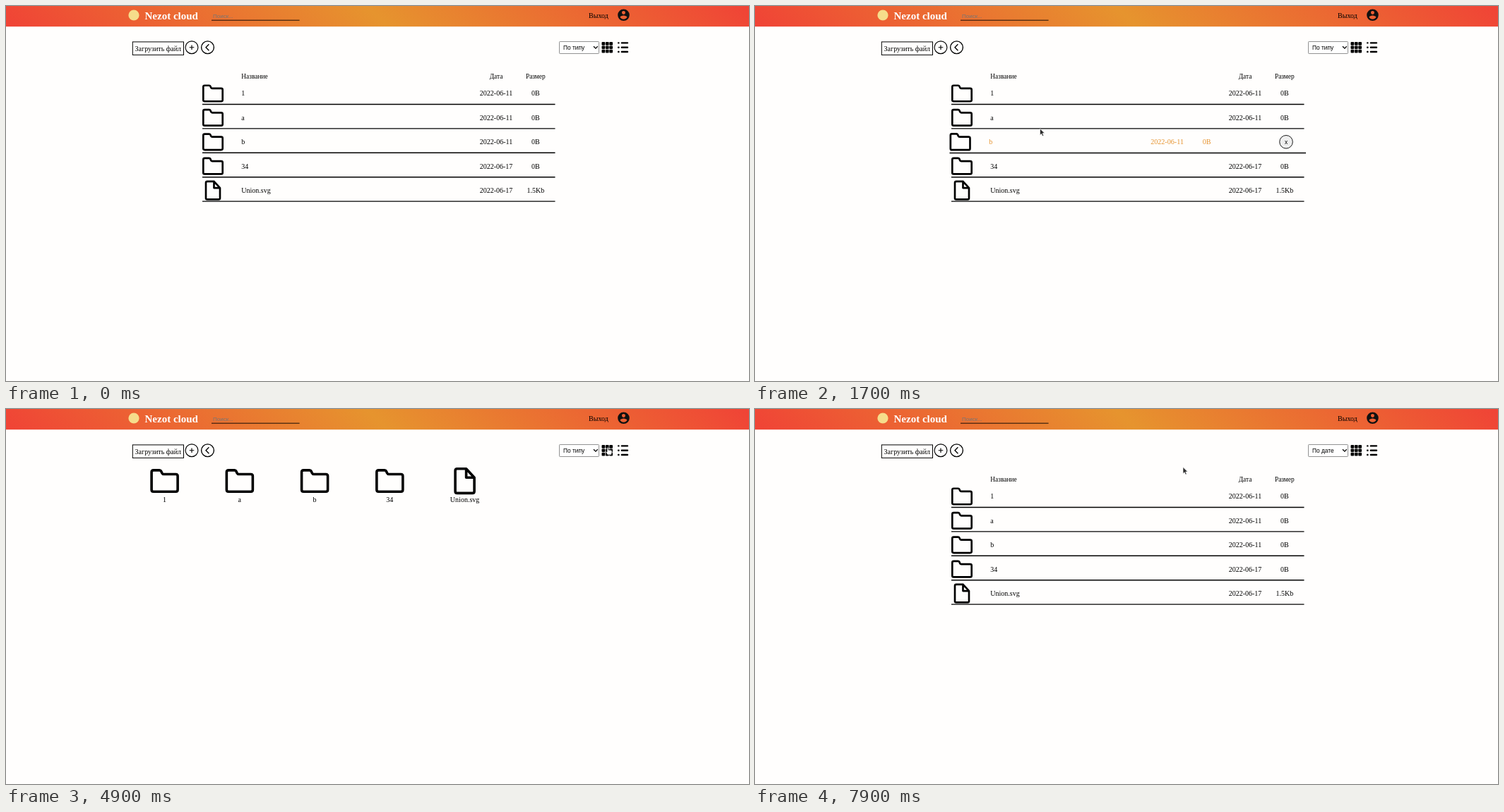
Write an HTML page that moves like this. It is 1052 px wide and 532 px high and loops after 8000 ms.

```html
<!DOCTYPE html>
<html lang="ru">
<head>
<meta charset="utf-8">
<title>Файлы</title>
<style>
  html, body { margin: 0; width: 100%; height: 100%; overflow: hidden; background: #fffefd; }
  svg { display: block; width: 1052px; height: 532px; }
  text { font: 10.02px "Liberation Serif", serif; white-space: pre; }
  .sans { font: 8.35px "Liberation Sans", sans-serif; }
  .mid { text-anchor: middle; }
  .line { fill: none; stroke: #000; }
</style>
</head>
<body>
<svg viewBox="0 0 1052 532">
  <defs>
    <linearGradient id="sunset" gradientUnits="userSpaceOnUse" x1="256" y1="285" x2="796" y2="-255">
      <stop offset="0" stop-color="#f04336"/>
      <stop offset=".5" stop-color="#e6942e"/>
      <stop offset="1" stop-color="#f04336"/>
    </linearGradient>
    <filter id="shadow" x="-20%" y="-20%" width="140%" height="150%">
      <feDropShadow dx="0" dy="1.5" stdDeviation="1.6" flood-opacity=".4"/>
    </filter>
    <path id="folder" class="line" stroke-width="3.6" stroke-linejoin="round" d="M-18.5-12.5q0-2.7 2.7-2.7h8.5q1.8 0 2.5 1.6l1 2.4q.7 1.6 2.5 1.6h17.1q2.7 0 2.7 2.7v19.4q0 2.7-2.7 2.7h-31.6q-2.7 0-2.7-2.7z"/>
    <path id="file" class="line" stroke-width="3.6" stroke-linejoin="round" d="M13.5-4.8H2V-17.3H-10.8q-2.7 0-2.7 2.7V14.6q0 2.7 2.7 2.7H10.8q2.7 0 2.7-2.7V-4.8L2-17.3"/>
    <path id="arrow" fill="#2b2b2b" stroke="#fff" stroke-width=".6" d="M0 0v9.2l2.1-2 1.5 3.4 1.6-.7-1.5-3.3h2.9z"/>
    <path id="hand" fill="#fff" stroke="#222" stroke-width=".8" stroke-linejoin="round" d="M-1 .9q1-1.5 2 0v3.3q1-.8 1.7.2 1-.7 1.7.3 1.2-.4 1.6.8v2.6l-1 3h-5.2l-2.6-4q-.4-1.4 1.8-.2z"/>
  </defs>

  <rect width="1052" height="532" fill="#fffefd"/>
  <rect width="1052" height="29.2" fill="url(#sunset)"/>
  <circle cx="181" cy="13" r="7.6" fill="#f6dd8b"/>
  <text x="196.5" y="18.6" fill="#fff" style="font-size:15px;font-weight:bold">Nezot cloud</text>
  <text class="sans" x="293" y="16.6" fill="#757575" style="font-size:8px">Поиск...</text>
  <path class="line" d="M291 20.2H415.6" stroke-width=".9"/>
  <text x="825" y="17.3">Выход</text>
  <path transform="translate(864.5 2.8) scale(.83)" fill="#111" fill-rule="evenodd" d="M12 2a10 10 0 1 0 0 20 10 10 0 1 0 0-20zm0 3a3 3 0 1 1 0 6 3 3 0 1 1 0-6zm0 14.2c-2.5 0-4.7-1.3-6-3.2 0-2 4-3.1 6-3.1s6 1.1 6 3.1c-1.3 1.9-3.5 3.2-6 3.2z"/>

  <rect class="line" x="179.3" y="50.9" width="72.2" height="18.5"/>
  <text x="182.6" y="63.8">Загрузить файл</text>
  <g class="line" stroke-width="1.35">
    <path d="M259.7 58.7h6.6M263 55.4v6.6" stroke-width="1.15"/>
    <circle cx="263" cy="58.7" r="8.9" stroke-width="1.15"/>
    <circle cx="285.5" cy="58.7" r="8.9"/>
    <path d="M287.4 54.2l-4.4 4.5 4.4 4.5"/>
  </g>
  <g id="icons"></g>
  <rect x="783.5" y="50.5" width="56" height="17" rx=".8" fill="#fff" stroke="#767676" stroke-width=".8"/>
  <text id="order" class="sans" x="789" y="62"></text>
  <path class="line" d="M832 57.2l2.9 2.9 2.9-2.9" stroke-width="1.3"/>
  <g id="files"></g>
  <g id="menu"></g>
  <use id="cursor"/>
</svg>

<script>
const LOOP = 8000, STEP = 100;
const ORANGE = '#e69430';
const ROW = 34.4, FIRST = 124, LEFT = 278, RIGHT = 777.5, CENTER = (LEFT + RIGHT) / 2;
const DATE = 694, SIZE = 749.8;
const OPTION = 10.8, MENU_TOP = 68;
const names = ['1', 'a', 'b', '34', 'Union.svg'];
const orders = ['По имени', 'По типу', 'По дате'];
const isFile = name => name.includes('.');

// Pointer moves: start, duration, x and y reached; it rests in between
const moves = [
  [300, 400, 385, 256],
  [700, 200, 428, 190],
  [1000, 200, 424, 108],
  [1200, 200, 405, 226],
  [1500, 400, 402, 122],
  [1900, 500, 391, 247],
  [2580, 520, 736, 232],
  [3400, 200, 744, 219],
  [3700, 40, 755, 248],
  [3800, 300, 838, 56],
  [4200, 300, 852, 54],
  [5100, 100, 856, 56],
  [5300, 100, 871, 60],
  [5700, 400, 800, 125],
  [6100, 400, 829.5, 58],
  [6900, 200, 830, 80],
  [7200, 100, 830, 90],
  [7400, 500, 606, 82.5]
];

const $ = id => document.getElementById(id);
const text = (x, y, s, cls = '', fill = '#000') =>
  `<text x="${x}" y="${y}" class="${cls}" fill="${fill}">${s}</text>`;
const icon = (name, x, y, k) =>
  `<use href="#${isFile(name) ? 'file' : 'folder'}" transform="translate(${x} ${y}) scale(${k})"/>`;
const button = (x, y, s) =>
  `<circle cx="${x}" cy="${y}" r="9.2" fill="#efefef" stroke="#000" stroke-width=".9"/>` +
  text(x, y + 2.8, s, 'sans mid');

function ease(k) {
  k = Math.min(1, Math.max(0, k));
  return k * k * (3 - 2 * k);
}

function pointAt(t) {
  let x = 235, y = 68;
  for (const [start, span, toX, toY] of moves) {
    const k = ease((t - start) / span);
    x += (toX - x) * k;
    y += (toY - y) * k;
  }
  return [x, y];
}

// The highlighted row trails the pointer slightly
function hoveredRow(t) {
  const [x, y] = pointAt(t - 60);
  return x > LEFT && x < RIGHT ? Math.round((y - FIRST) / ROW) : -1;
}

function listRow(name, i, hot) {
  const y = FIRST + i * ROW, base = y + 3.3;
  const color = hot ? ORANGE : '#000';
  const s = icon(name, 293, y, .74) + text(333.2, base, name, '', color) +
    text(hot ? 583 : DATE, base, i < 3 ? '2022-06-11' : '2022-06-17', 'mid', color) +
    text(hot ? 638.6 : SIZE, base, isFile(name) ? '1.5Kb' : '0B', 'mid', color) +
    `<path class="line" d="M${LEFT} ${y + 15.5}H${RIGHT}" stroke-width="1.4"/>`;
  if (!hot) return s;
  const buttons = (isFile(name) ? button(DATE + .3, y, '+') : '') + button(SIZE, y, 'x');
  return `<g transform="translate(${CENTER} ${y}) scale(1.01) translate(${-CENTER} ${-y})">${s}${buttons}</g>`;
}

function listView(hot) {
  const head = [[352, 'Название'], [DATE, 'Дата'], [SIZE, 'Размер']]
    .map(([x, s]) => `<text class="mid" x="${x}" y="103" style="font-size:9.4px">${s}</text>`);
  return head.join('') + names.map((name, i) => listRow(name, i, i === hot)).join('');
}

function gridView() {
  return names.map((name, i) => {
    const x = 224.6 + i * 106.25;
    return icon(name, x, 102.1, 1) + text(x, 131.8, name, 'mid');
  }).join('');
}

function menu(active) {
  const rows = orders.map((s, i) => {
    const y = MENU_TOP + i * OPTION, on = i === active;
    return (on ? `<rect x="784" y="${y}" width="55.4" height="${OPTION}" fill="#1e90ff"/>` : '') +
      text(789, y + 8.2, s, 'sans', on ? '#fff' : '#000');
  });
  return '<rect x="783.6" y="67.8" width="56" height="33" fill="#efefef" stroke="#777" stroke-width=".8" filter="url(#shadow)"/>' +
    rows.join('');
}

function drawIcons() {
  const bar = (x, y, w, h) => `<rect x="${x}" y="${y}" width="${w}" height="${h}" rx="1"/>`;
  let s = '';
  for (let r = 0; r < 3; r++) {
    for (let c = 0; c < 3; c++) s += bar(843.5 + c * 5.4, 51 + r * 5.4, 4.7, 4.7);
    s += bar(866, 51.2 + r * 6.3, 2.6, 2.4) + bar(870.7, 51.2 + r * 6.3, 10.4, 2.4);
  }
  $('icons').innerHTML = s;
}

function render(t) {
  const [x, y] = pointAt(t);
  const grid = t >= 4900 && t < 5700;
  const open = t >= 6600 && t < 7500;
  const overIcons = x > 843 && y > 49 && y < 68;
  $('files').innerHTML = grid ? gridView() : listView(hoveredRow(t));
  $('menu').innerHTML = open ? menu(y < MENU_TOP ? 1 : Math.floor((y - MENU_TOP) / OPTION)) : '';
  $('order').textContent = orders[t >= 7500 ? 2 : 1];
  const cursor = $('cursor');
  cursor.setAttribute('href', overIcons ? '#hand' : '#arrow');
  cursor.setAttribute('transform', `translate(${x} ${y})`);
  cursor.setAttribute('visibility', t < 300 ? 'hidden' : 'visible');
}

let shown = -1;
const start = performance.now();
function tick() {
  const t = Math.floor((performance.now() - start) % LOOP / STEP) * STEP;
  if (t !== shown) render(shown = t);
  requestAnimationFrame(tick);
}
drawIcons();
tick();
</script>
</body>
</html>
```
